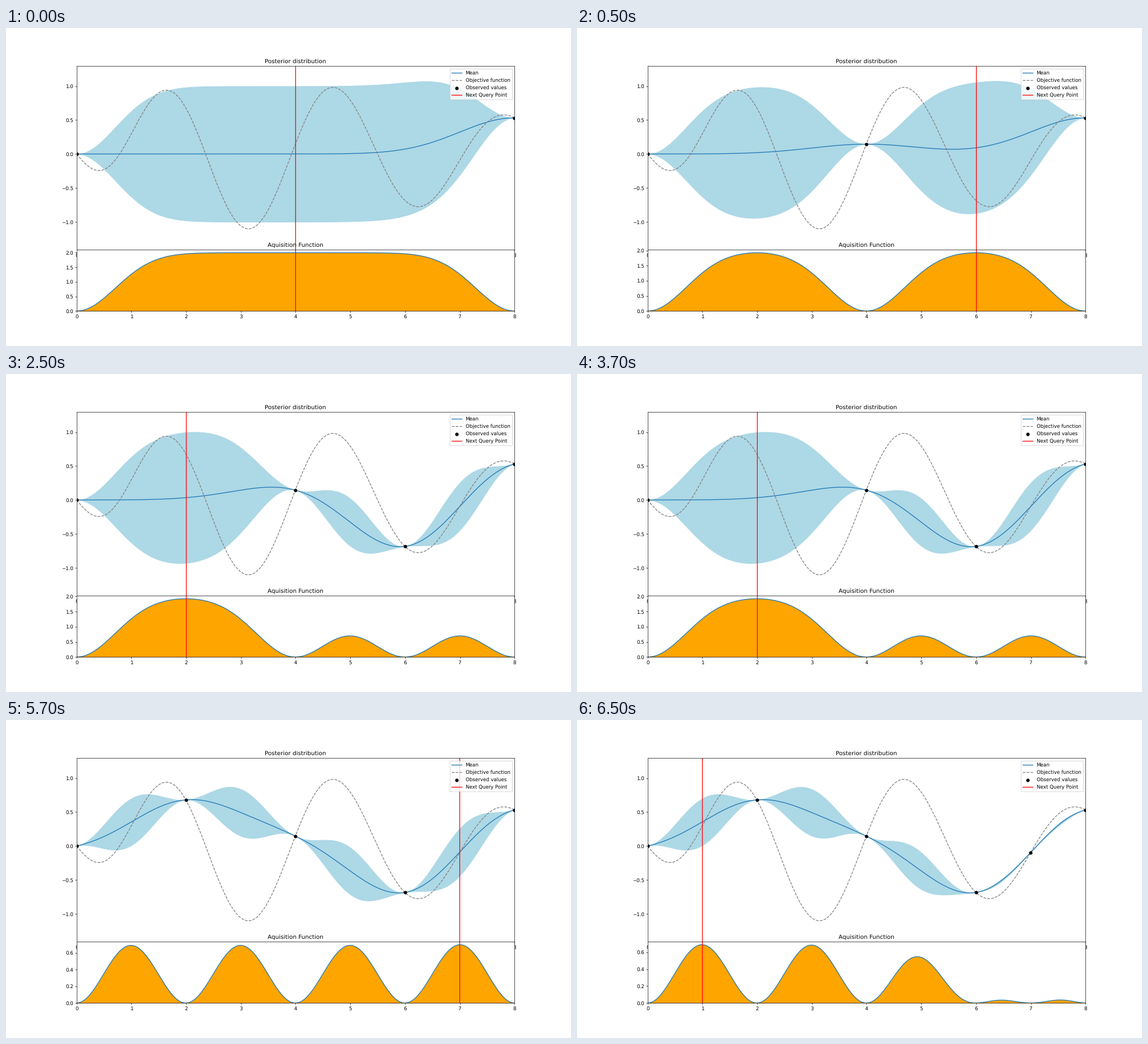
Write a matplotlib script that moves like this. It is 998 px wide and 561 px high and loops after 8 s.

```python
import matplotlib.pyplot as plt
import numpy as np
from matplotlib.animation import FuncAnimation

plt.rcParams["font.family"] = "DejaVu Sans"
plt.rcParams["text.hinting"] = "none"

INTERVAL = 500
FRAMES = 16
GRID = np.linspace(0, 8, 1000)
START = [0, 999]
QUERIES = [499, 749, 249, 874, 124]  # grid indices of the successive queries


def objective(x):
    return -x * np.exp(-x / 3) * np.cos(2 * x)


def kernel(a, b):
    return np.exp(-0.5 * (a[:, None] - b[None, :]) ** 2)


def posterior(x_obs):
    """Mean and variance of a noise-free Gaussian process on the grid."""
    cross = kernel(GRID, x_obs)
    weights = np.linalg.solve(kernel(x_obs, x_obs), cross.T).T
    mean = weights @ objective(x_obs)
    variance = 1 - np.sum(weights * cross, axis=1)
    return mean, np.maximum(variance, 0)


fig, (top, bottom) = plt.subplots(
    2, 1, figsize=(16, 8.99400), dpi=62.375,
    gridspec_kw={"height_ratios": [3, 1], "hspace": 0})


def draw_posterior(x_obs, mean, variance, query):
    top.clear()
    top.fill_between(GRID, mean - variance, mean + variance, color="lightblue")
    mean_line, = top.plot(GRID, mean, color="C0", label="Mean")
    truth, = top.plot(GRID, objective(GRID), "--", color="gray",
                      label="Objective function")
    dots = top.scatter(x_obs, objective(x_obs), color="black", zorder=3,
                       label="Observed values")
    marker = top.axvline(query, color="red", label="Next Query Point")
    top.set(title="Posterior distribution", xlim=(0, 8), ylim=(-1.412, 1.294))
    top.legend(handles=[mean_line, truth, dots, marker], loc="upper right")


def draw_acquisition(acquisition, query):
    bottom.clear()
    bottom.fill_between(GRID, 0, acquisition, color="orange")
    bottom.plot(GRID, acquisition, color="C0")
    bottom.axvline(query, color="red")
    bottom.set(title="Aquisition Function", xlim=(0, 8),
               ylim=(0, 1.05 * acquisition.max()))


def update(frame):
    step = (frame * INTERVAL + 1500) // 2000
    x_obs = GRID[START + QUERIES[:step]]
    query = GRID[QUERIES[step]]
    mean, variance = posterior(x_obs)
    draw_posterior(x_obs, mean, variance, query)
    draw_acquisition(2 * variance, query)
    return []


anim = FuncAnimation(fig, update, frames=FRAMES, interval=INTERVAL,
                     init_func=lambda: update(0), repeat=True, repeat_delay=0)
plt.show()
```
